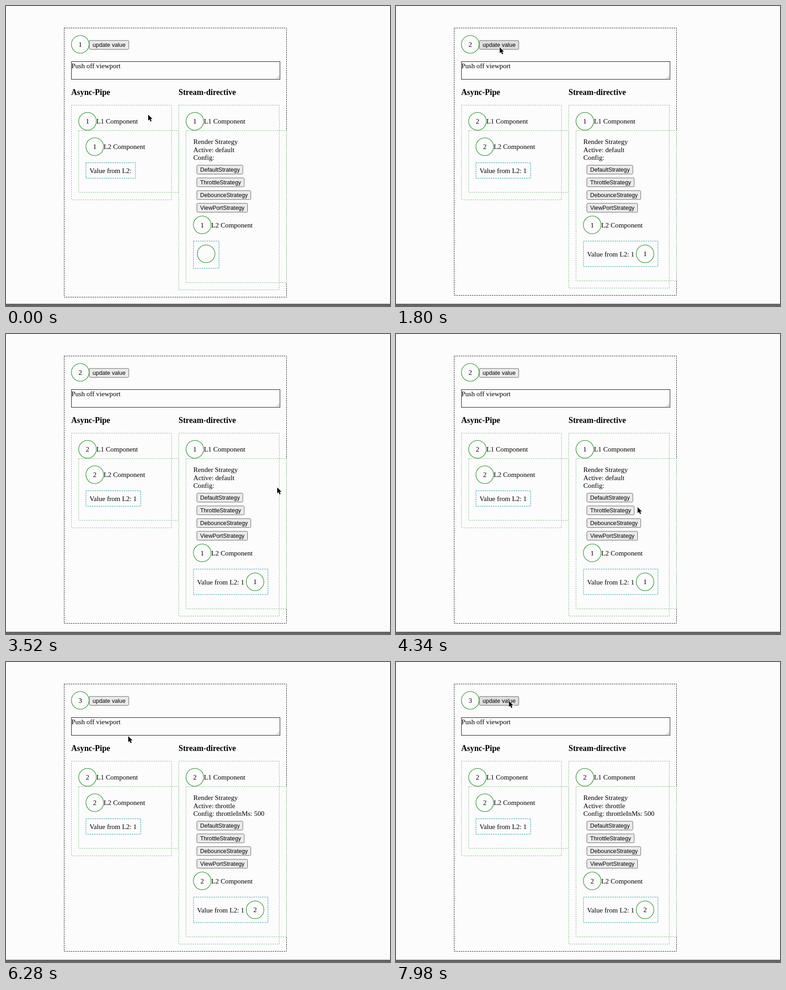
An HTML page that plays this animation: 848 px wide and 661 px high, repeating every 8 s.

```html
<!DOCTYPE html>
<html lang="en">
<head>
<meta charset="utf-8">
<title>Render strategies</title>
<style>
  html, body { margin: 0; width: 100%; height: 100%; overflow: hidden; background: #fcfcfd; }
  svg { display: block; width: 848px; height: 661px; }
  text { font: 15.2px "Liberation Serif", Times, serif; fill: #000; }
  .heading { font-weight: bold; font-size: 17.8px; }
  .label { font: 12.7px "Liberation Sans", Arial, sans-serif; }
  .digit { text-anchor: middle; }
  .box { fill: none; stroke-dasharray: 3 1.9; }
  .outer { stroke: #111; }
  .level { stroke: #84bd84; }
  .value { stroke: #129494; }
  .ring { fill: none; stroke: #138613; stroke-width: 1.1; }
  .button { fill: #ebebeb; stroke: #636363; }
  .button.hover { fill: #dedede; }
</style>
</head>
<body>
<svg id="stage" viewBox="0 0 848 661"></svg>
<script>
const LOOP = 8000, UPDATE = 1720, THROTTLE = 5400;
const stage = document.getElementById('stage');

// Pointer path: time, x, y of the tip
const path = [
  [0, 314, 239.5], [500, 314, 239.5], [1000, 268, 165], [1450, 229, 91],
  [2350, 229, 91], [2600, 325, 84], [2920, 509, 117], [3140, 605, 182],
  [3300, 632, 250], [3520, 599, 338], [3900, 560, 372], [4500, 524, 385],
  [5000, 513, 384.5], [5500, 513, 384.5], [5850, 415, 300],
  [6280, 270, 163.5], [6900, 249.5, 86], [LOOP, 249.5, 86]
];

function add(tag, attrs, content = '') {
  const el = document.createElementNS('http://www.w3.org/2000/svg', tag);
  for (const key in attrs) el.setAttribute(key, attrs[key]);
  el.textContent = content;
  return stage.appendChild(el);
}

const write = (x, y, content, cls = '') => add('text', { x, y, class: cls }, content);

function box(kind, x, y, right, bottom) {
  return add('rect', { class: 'box ' + kind, x, y, width: right - x, height: bottom - y });
}

function resize(el, right, bottom) {
  el.setAttribute('width', right - el.getAttribute('x'));
  el.setAttribute('height', bottom - el.getAttribute('y'));
}

function counter(x, y) {
  const ring = add('circle', { class: 'ring', cx: x, cy: y, r: 19.5 });
  const digit = write(x, y + 5.3, '', 'digit');
  return {
    show(n) { digit.textContent = n; },
    move(cx) { ring.setAttribute('cx', cx); digit.setAttribute('x', cx); }
  };
}

function button(x, y, width, label) {
  const el = add('rect', { class: 'button', x, y, width, height: 19.5, rx: 2 });
  write(x + 7.3, y + 14.2, label, 'label');
  return { el, contains: (px, py) => px >= x && px <= x + width && py >= y && py <= y + 20 };
}

add('rect', { y: 656, width: 848, height: 5, fill: '#666' });

const outer = box('outer', 128.5, 48.5, 619.5, 641.5);
const top1 = counter(164, 84.5);
const buttons = [button(184, 76, 87, 'update value')];

add('rect', { x: 144.5, y: 122.5, width: 460.5, height: 39, fill: 'none', stroke: '#111' });
add('path', { d: 'M597 160L604 153M601 160L604 157', stroke: '#777', 'stroke-width': .8 });
write(144.5, 137, 'Push off viewport');

write(144, 195.7, 'Async-Pipe', 'heading');
box('level', 144.5, 218.5, 365.5, 427);
box('level', 160.5, 274.5, 381.5, 410.5);
const asyncL1 = counter(180, 254);
write(199.8, 259.3, 'L1 Component');
const asyncL2 = counter(196, 310);
write(215.8, 315.3, 'L2 Component');
const asyncBox = box('value', 176.5, 345.5, 286, 379.5);
const asyncValue = write(184.5, 367.8, '');

write(381, 195.7, 'Stream-directive', 'heading');
const streamBox1 = box('level', 381.5, 218.5, 603.5, 625.5);
const streamBox2 = box('level', 397.5, 274.5, 619.5, 609.5);
const streamL1 = counter(417, 254);
write(437, 259.3, 'L1 Component');
write(413.7, 304, 'Render Strategy');
const active = write(413.7, 321.7, '');
const config = write(413.7, 339.3, '');
buttons.push(
  button(421.5, 350.8, 101.5, 'DefaultStrategy'),
  button(421.5, 378.8, 104.5, 'ThrottleStrategy'),
  button(421.5, 406.8, 119, 'DebounceStrategy'),
  button(421.5, 434.8, 112, 'ViewPortStrategy')
);
const streamL2 = counter(433.3, 482.3);
write(453.3, 487.6, 'L2 Component');
const streamValueBox = box('value', 414, 518, 470.5, 578);
const streamValue = write(422, 551.5, '');
const streamCount = counter(442, 546);

const pointer = add('path', {
  d: 'M0 0V13L3 10.3 5.2 15.3 7.5 14.3 5.3 9.4H9.3Z',
  fill: '#000', stroke: '#fff', 'stroke-width': 1.6, 'paint-order': 'stroke'
});

function pointerAt(t) {
  const i = path.findIndex(p => p[0] > t);
  const [t0, x0, y0] = path[i - 1], [t1, x1, y1] = path[i];
  const k = (t - t0) / (t1 - t0);
  return [x0 + (x1 - x0) * k, y0 + (y1 - y0) * k];
}

function showState(step) {
  const updated = step > 0, throttled = step > 1;
  const rise = updated ? 4 : 0;
  top1.show(step + 1);
  for (const c of [asyncL1, asyncL2]) c.show(updated ? 2 : 1);
  for (const c of [streamL1, streamL2]) c.show(throttled ? 2 : 1);
  streamCount.show(updated ? step : '');
  streamCount.move(updated ? 550 : 442);
  asyncValue.textContent = updated ? 'Value from L2: 1' : 'Value from L2:';
  streamValue.textContent = updated ? 'Value from L2: 1' : '';
  active.textContent = 'Active: ' + (throttled ? 'throttle' : 'default');
  config.textContent = 'Config:' + (throttled ? ' throttleInMs: 500' : '');
  resize(outer, 619.5, 641.5 - rise);
  resize(streamBox1, 603.5, 625.5 - rise);
  resize(streamBox2, 619.5, 609.5 - rise);
  resize(asyncBox, updated ? 297.5 : 286, 379.5);
  resize(streamValueBox, updated ? 578.5 : 470.5, 578 - rise);
}

const start = performance.now();
let shown = -1;

function draw() {
  const t = (performance.now() - start) % LOOP;
  const step = (t >= UPDATE) + (t >= THROTTLE);
  if (step !== shown) showState(shown = step);
  const [x, y] = pointerAt(t);
  pointer.setAttribute('transform', `translate(${x} ${y})`);
  for (const b of buttons) b.el.classList.toggle('hover', b.contains(x, y));
  requestAnimationFrame(draw);
}
draw();
</script>
</body>
</html>
```
